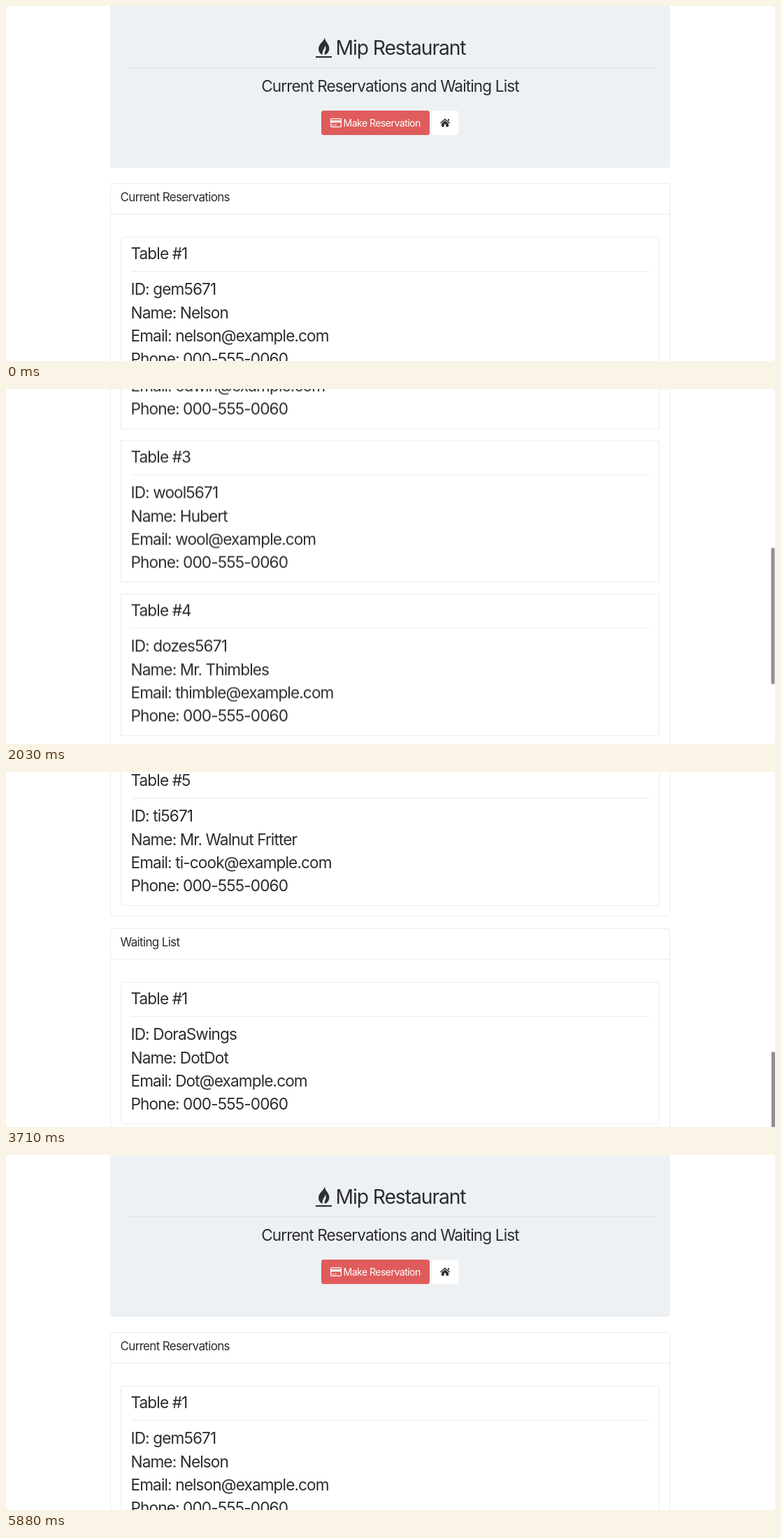
Write an HTML page that moves like this. It is 1100x509 px and loops after 6.02 s.

```html
<!DOCTYPE html>
<html lang="en">
<head>
<meta charset="utf-8">
<title>Reservations</title>
<style>
html, body { margin: 0; width: 100%; height: 100%; overflow: hidden; background: #c4c4c4; }
#stage { position: relative; width: 1100px; height: 509px; overflow: hidden; background: #fff; border-radius: 2px;
  font: 22.6px/34px Inter, "Open Sans", sans-serif; color: #2b2c2e; }
#page { position: absolute; left: 0; top: 0; width: 1100px; height: 1800px; will-change: transform; }
#page div, #page svg { position: absolute; box-sizing: border-box; white-space: nowrap; letter-spacing: -.039em; }
.hero { left: 149px; top: -4px; width: 801px; height: 235.5px; background: #eef1f4; border-radius: 4px; }
.rule { height: 1px; background: #ececec; }
.hero-rule { left: 172px; top: 88px; width: 755px; background: #dfe2e5; }
.title { left: 471.5px; top: 43px; font-size: 28.3px; }
.sub { left: 149px; top: 98px; width: 801px; text-align: center; }
.btn { top: 150px; height: 35px; border-radius: 3.5px; font-size: 14.1px; line-height: 35px; }
.make { left: 451px; width: 155px; padding-left: 31.5px; background: #e05c5c; color: #fff; }
.home { left: 609px; width: 38px; background: #fff; }
.card { left: 149px; width: 801px; border: 1px solid #ebebeb; border-radius: 3.5px; }
.head { left: 13.5px; top: 2px; font-size: 17px; }
.card > .rule { left: 0; right: 0; top: 43px; }
.table { left: 14px; width: 771px; height: 204px; border: 1px solid #ebebeb; }
.table .rule { left: 14px; width: 741px; top: 48px; }
.row { left: 13.5px; }
#thumb { position: absolute; left: 1094px; top: 0; width: 5px; height: 196px; border-radius: 2.5px; background: #909090;
  will-change: transform; }
</style>
</head>
<body>
<div id="stage">
  <div id="page">
    <div class="hero"></div>
    <svg width="1100" height="240" style="left:0;top:0;z-index:1">
      <g fill="#2f3032">
        <path d="M443 72h23v2.2h-23z"/>
        <path d="M455.6 45C456.4 50 447 53.5 447 61.5c0 4 2.2 7 5.8 8.6-.6-3 0-5.600 1.700-8.200 1.200-1.900 2-3.400 1.900-5.400 1.600 2.500 1.700 5 .3 7.800-1.200 2.300-1.500 4.200-.5 5.800 3.800-1.600 6.200-5 6.200-9.300 0-6.300-5.600-9-6.800-15.800z"/>
        <path d="M628 161.200l7 6.300-1 1.100-6-5.400-6 5.400-1-1.100zM632 162h1.900v3.500l-1.900-1.700z"/>
        <path d="M628 164.300l5 4.500v4.200h-3.700v-3.500h-2.600v3.500H623v-4.200z"/>
      </g>
      <g fill="#fff">
        <rect x="464.600" y="161.600" width="14.800" height="11.800" rx="1.300" fill="none" stroke="#fff" stroke-width="1.200"/>
        <path d="M464.600 164h14.800v3.200h-14.800zM466.400 170.200h2.200v1.100h-2.200zM469.600 170.200h3.200v1.100h-3.200z"/>
      </g>
    </svg>
    <div class="title">Mip Restaurant</div>
    <div class="rule hero-rule"></div>
    <div class="sub">Current Reservations and Waiting List</div>
    <div class="btn make">Make Reservation</div>
    <div class="btn home"></div>
  </div>
  <div id="thumb"></div>
</div>
<script>
const page = document.getElementById('page');
const thumb = document.getElementById('thumb');
const PHONE = '000-555-0060';
const STEP = 70, LOOP = 6020;

const booked = [
  ['gem5671', 'Nelson', 'nelson'],
  ['dune5671', 'Edwin', 'edwin'],
  ['wool5671', 'Hubert', 'wool'],
  ['dozes5671', 'Mr. Thimbles', 'thimble'],
  ['ti5671', 'Mr. Walnut Fritter', 'ti-cook']
];
const waiting = [['DoraSwings', 'DotDot', 'Dot']];

function add(parent, cls, text = '', style = {}) {
  const el = document.createElement('div');
  el.className = cls;
  el.textContent = text;
  Object.assign(el.style, style);
  parent.append(el);
  return el;
}

function addCard(top, height, name, guests) {
  const card = add(page, 'card', '', { top: top + 'px', height: height + 'px' });
  add(card, 'head', name);
  add(card, 'rule');
  guests.forEach(([id, guest, mail], i) => {
    const upper = i === 0 ? 3.5 : 0, lower = i === guests.length - 1 ? 3.5 : 0;
    const box = add(card, 'table', '', {
      top: 76 + 220 * i + 'px',
      borderRadius: `${upper}px ${upper}px ${lower}px ${lower}px`
    });
    const row = (y, text) => add(box, 'row', text, { top: y - 18 + 'px' });
    row(24, `Table #${i + 1}`);
    add(box, 'rule');
    [`ID: ${id}`, `Name: ${guest}`, `Email: ${mail}@example.com`, `Phone: ${PHONE}`]
      .forEach((text, n) => row(75.2 + 33.4 * n, text));
  });
}

addCard(254, 1176, 'Current Reservations', booked);
addCard(1447, 295, 'Waiting List', waiting);

// time, scroll offset
const path = [[350, 0], [1330, 463], [2030, 697.5], [2730, 1002], [3710, 1223], [4690, 638], [5420, 0]];

// slope at a point; flat at ends and turning points
function slope(i) {
  if (i === 0 || i === path.length - 1) return 0;
  const [a, b, c] = path.slice(i - 1, i + 2);
  const m = (b[1] - a[1]) / (b[0] - a[0]), n = (c[1] - b[1]) / (c[0] - b[0]);
  return m * n <= 0 ? 0 : 2 * m * n / (m + n);
}

function scrollAt(t) {
  const i = path.findIndex(p => p[0] > t) - 1;
  if (i < 0) return 0;
  const [t0, a] = path[i], [t1, b] = path[i + 1];
  const d = t1 - t0, u = (t - t0) / d, v = 1 - u;
  return a * v * v * (1 + 2 * u) + b * u * u * (3 - 2 * u)
    + d * u * v * (slope(i) * v - slope(i + 1) * u);
}

function draw(now) {
  const t = Math.floor(now % LOOP / STEP) * STEP;
  const y = scrollAt(t);
  page.style.transform = `translateY(${-Math.round(y * 2) / 2}px)`;
  thumb.style.transform = `translate(.5px, ${-3.2 + y * .3305}px)`;
  thumb.style.opacity = t < 420 ? 0 : Math.max(0, Math.min(1, (5880 - t) / 210));
  requestAnimationFrame(draw);
}
draw(performance.now());
</script>
</body>
</html>
```
